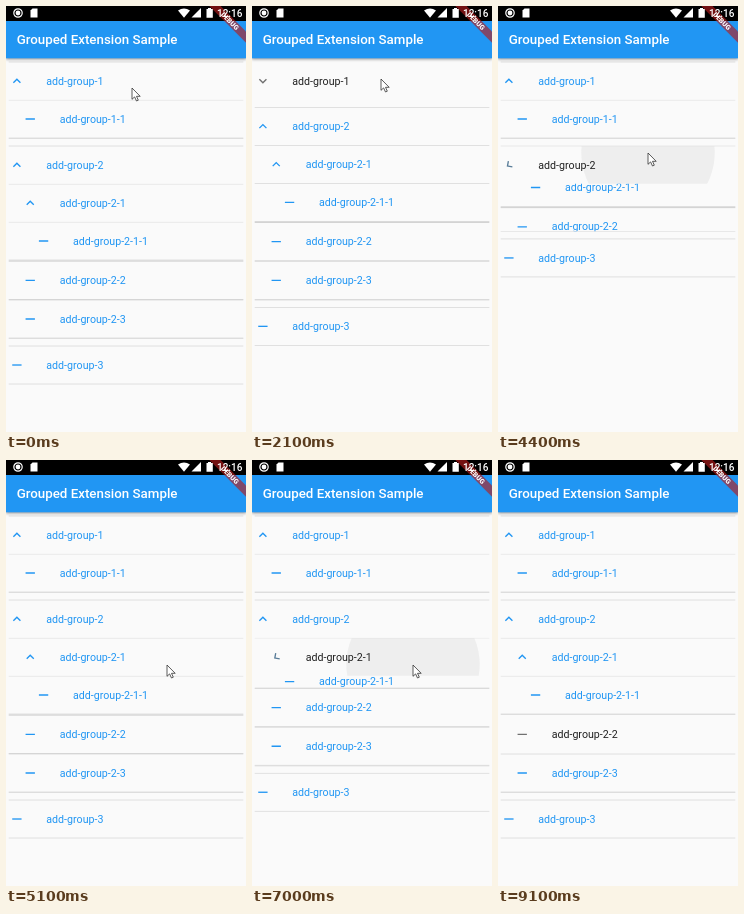
These frames come from a looping animation (240x426 px, 9500 ms). An HTML page:

```html
<!DOCTYPE html>
<html lang="en">
<head>
<meta charset="utf-8">
<title>Grouped Extension Sample</title>
<style>
  html, body { margin: 0; width: 100%; height: 100%; overflow: hidden; background: #fafafa; }
  svg { font-family: Roboto, sans-serif; }
  #stage { display: block; width: 240px; height: 426px; }
  .label { font-size: 10.67px; }
  .bar { filter: drop-shadow(0 1.5px 1.8px rgba(0, 0, 0, .4)); }
</style>
</head>
<body>
<svg id="stage" viewBox="0 0 240 426">
  <rect width="240" height="426" fill="#fafafa"/>
  <g id="list"></g>
  <rect class="bar" y="15" width="240" height="37.3" fill="#2196f3"/>
  <text x="10.67" y="38.3" font-size="13.33" font-weight="500" fill="#fff">Grouped Extension Sample</text>
  <rect width="240" height="15" fill="#000"/>
  <g transform="translate(240 -1) rotate(45)">
    <rect x="-26.67" y="18.67" width="53.33" height="8" fill="#b71c1c" fill-opacity=".63"/>
    <text y="25.1" font-size="6.8" font-weight="900" fill="#fff" text-anchor="middle">DEBUG</text>
  </g>
  <g fill="#fff">
    <circle cx="12" cy="7" r="4.2" fill="none" stroke="#fff" stroke-width="1.2"/>
    <circle cx="12" cy="7" r="2.4"/>
    <path d="M26.5 2.5H31.5V11.5H24.5V4.5Z"/>
    <path d="M172 4.5Q178 .5 184 4.5L178 11.8Z"/>
    <path d="M195 2V11.5H185.5Z"/>
    <path d="M200.5 3H202V2H205V3H206.8V11.8H200.5Z"/>
    <text x="211" y="10.8" font-size="10" font-weight="500">12:16</text>
  </g>
  <path id="cursor" d="M0 0V11.3L2.6 8.9 4.5 13 6.3 12.2 4.5 8.3H8.2Z"
        fill="#fff" stroke="#333" stroke-width=".8"/>
</svg>
<script>
const LOOP = 9500, STEP = 100;
const DP = 2 / 3, ROW = 56 * DP;
const BLUE = [33, 150, 243], INK = [33, 33, 33], GREY = [112, 112, 112];

const groups = [
  ['1', [['1-1', []]]],
  ['2', [['2-1', [['2-1-1', []]]], ['2-2', []], ['2-3', []]]],
  ['3', []],
];

// Taps per tile: times, and the touch point inside its row
const taps = {
  '1': { at: [1220, 2250], x: 129, y: 16.7 },
  '2': { at: [3167, 4300], x: 150, y: 6.7 },
  '2-1': { at: [5700, 6900], x: 161, y: 26 },
  '2-2': { at: [8000], x: 153, y: 15 },
};

// Pointer stops: time, x, y
const path = [
  [0, 126, 82], [400, 126, 82], [900, 129, 73], [2500, 129, 73],
  [3000, 150, 147], [4600, 150, 147], [5100, 161, 205], [7100, 161, 205],
  [7700, 153, 270], [8300, 153, 270], [8700, 246, 180], [LOOP, 246, 180],
];

const clamp = v => Math.min(1, Math.max(0, v));
const easeIn = p => p ** 1.7;
const easeOut = p => 1 - easeIn(1 - p);
const mix = (a, b, p) => `rgb(${a.map((v, i) => Math.round(v + (b[i] - v) * p))})`;

// 1 = expanded, 0 = collapsed
function openness(id, t, delay = 0, duration = 200) {
  let p = 1;
  (taps[id]?.at || []).forEach((start, i) => {
    const q = (t - start - delay) / duration;
    if (q >= 0) p = i % 2 ? clamp(q) : 1 - clamp(q);
  });
  return p;
}

function ripple(id, t, y) {
  const tap = taps[id];
  const start = tap?.at.find(s => t >= s && t < s + 200);
  if (start === undefined) return '';
  const age = t - start;
  return `<svg x="2.67" y="${y}" width="234.67" height="${ROW}">
    <circle cx="${tap.x - 2.67}" cy="${tap.y}" r="${age * DP}"
      fill="#bcbcbc" fill-opacity="${0.4 * (1 - age / 200)}"/></svg>`;
}

function icon(isLeaf, v) {
  return isLeaf
    ? '<path d="M-7-1H7V1H-7Z"/>'
    : `<path transform="rotate(${180 * v})" d="M4.59-3.41L0 1.17-4.59-3.41-6-2 0 4 6-2Z"/>`;
}

function stack(tiles, depth, t, gap = 0) {
  let y = 0, svg = '';
  for (const item of tiles) {
    const part = tile(item, depth, t);
    svg += `<g transform="translate(0 ${y})">${part.svg}</g>`;
    y += part.height + gap;
  }
  return { svg, height: y };
}

function tile([id, kids], depth, t) {
  const p = openness(id, t), v = easeIn(p);
  const inner = stack(kids, depth + 1, t);
  const shown = inner.height * v;
  const top = DP, mid = top + ROW / 2, bottom = top + ROW;
  const indent = depth * 20 * DP;
  const line = y => `<rect x="2.67" y="${y}" width="234.67" height="${DP}"
    fill-opacity="${0.16 * easeOut(p)}"/>`;
  const svg = `${line(0)}${line(bottom + shown)}${ripple(id, t, top)}
    <g transform="translate(${10.9 + indent} ${mid}) scale(${DP})"
      fill="${mix(GREY, BLUE, v)}">${icon(!kids.length, v)}</g>
    <text class="label" x="${40.3 + indent}" y="${mid + 3.64}"
      fill="${mix(INK, BLUE, openness(id, t, 100, 220))}">add-group-${id}</text>
    <svg y="${bottom}" width="240" height="${shown}">
      <g transform="translate(0 ${(shown - inner.height) / 2})">${inner.svg}</g>
    </svg>`;
  return { svg, height: bottom + shown + DP };
}

function pointer(t) {
  const i = path.findIndex(stop => stop[0] > t);
  const [t0, x0, y0] = path[i - 1], [t1, x1, y1] = path[i];
  const p = (t - t0) / (t1 - t0), s = p * p * (3 - 2 * p);
  return [x0 + (x1 - x0) * s, y0 + (y1 - y0) * s];
}

const list = document.getElementById('list');
const cursor = document.getElementById('cursor');
list.setAttribute('transform', 'translate(0 55.67)');

let last = -1;
function frame() {
  const t = Math.floor(performance.now() % LOOP / STEP) * STEP;
  if (t !== last) {
    last = t;
    list.innerHTML = stack(groups, 0, t, 6.67).svg;
    cursor.setAttribute('transform', `translate(${pointer(t)})`);
  }
  requestAnimationFrame(frame);
}
frame();
</script>
</body>
</html>
```
